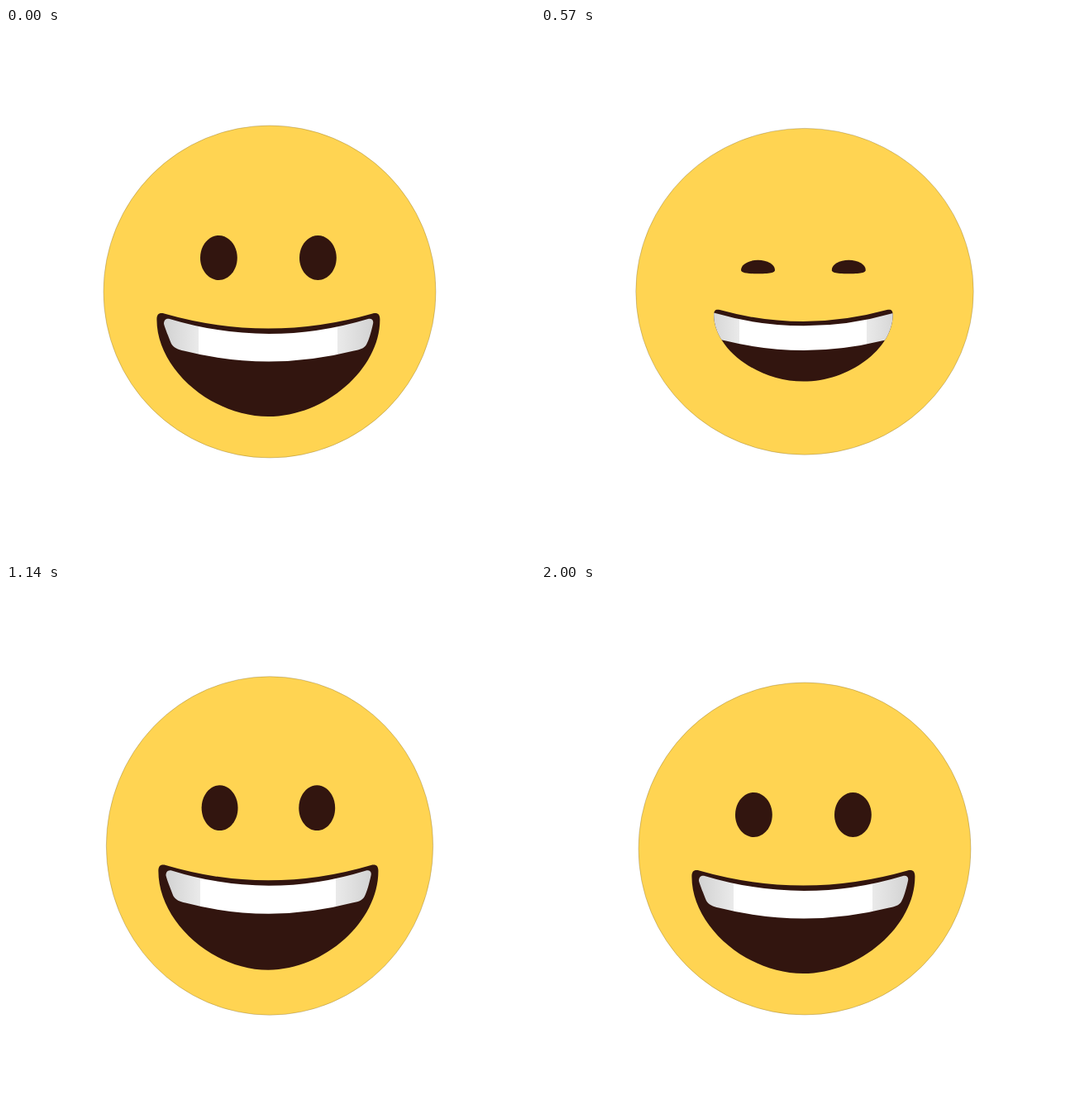
Write an HTML page that moves like this. It is 640 px wide and 640 px high and loops after 2070 ms.

```html
<!DOCTYPE html>
<html lang="en">
<head>
<meta charset="utf-8">
<title>Grinning face</title>
<style>
  html, body { margin: 0; width: 100%; height: 100%; overflow: hidden; background: #fff; }
  svg { display: block; width: 100%; height: 100%; }
</style>
</head>
<body>
<svg viewBox="0 0 640 640">
  <defs>
    <linearGradient id="shade" gradientUnits="userSpaceOnUse" x1="-127" x2="127" y1="0" y2="0">
      <stop offset="0" stop-color="#d2d2d2"/>
      <stop offset=".165" stop-color="#eaeaea"/>
      <stop offset=".165" stop-color="#fff"/>
      <stop offset=".825" stop-color="#fff"/>
      <stop offset=".825" stop-color="#eaeaea"/>
      <stop offset="1" stop-color="#d2d2d2"/>
    </linearGradient>
    <clipPath id="lips"><path id="lipsPath"/></clipPath>
  </defs>
  <ellipse id="head" cx="319" fill="#ffd452" stroke="#4a3a14" stroke-opacity=".5" stroke-width=".5"/>
  <g fill="#32150f">
    <path id="eyeL"/>
    <path id="eyeR"/>
    <path id="mouth"/>
  </g>
  <g clip-path="url(#lips)">
    <path id="teeth" fill="url(#shade)" d="M-127-12C-127-16-125-19-120-18Q0 18 120-18C125-19 127-16 126-12
      C124-3 121 8 118 13C115 18 110 19 103 20.5Q0 46.5-103 20.5C-110 19-115 17-118 12C-122 2-125-5-127-12Z"/>
  </g>
</svg>
<script>
const LOOP = 2070, FRAMES = 29, STEP = LOOP / FRAMES;
const HEAD = 319, FACE = 317.4, RADIUS = 201;
const $ = id => document.getElementById(id);
const set = (id, attrs) => {
  for (const name in attrs) $(id).setAttribute(name, attrs[name]);
};
const ease = u => (1 - Math.cos(Math.PI * u)) / 2;

// Eased swing through a few [frame, value] extremes
function swing(f, ...keys) {
  const i = Math.max(1, keys.findIndex(key => key[0] >= f));
  const [from, a] = keys[i - 1], [to, b] = keys[i];
  return a + (b - a) * ease((f - from) / (to - from));
}

// Ellipse whose underside flattens as the eye squints
function eyePath(x, y, r, top, low) {
  const k = .55, flat = k + .48 * (1 - low / top);
  return `M${x - r} ${y}C${x - r} ${y - k * top} ${x - k * r} ${y - top} ${x} ${y - top}
    C${x + k * r} ${y - top} ${x + r} ${y - k * top} ${x + r} ${y}
    C${x + r} ${y + k * low} ${x + flat * r} ${y + low} ${x} ${y + low}
    C${x - flat * r} ${y + low} ${x - r} ${y + k * low} ${x - r} ${y}Z`;
}

// Half bowl with a sagging lip and rounded corners
function mouthPath(x, y, w, sag, depth) {
  const r = w / 15, k = .51, l = x - w, e = x + w;
  const side = y + .8 * r, chin = y + depth, curve = side + k * (chin - side);
  return `M${l} ${side}C${l} ${y + .1 * r} ${l + .3 * r} ${y - .15 * r} ${l + r} ${y}
    Q${x} ${y + 2 * sag} ${e - r} ${y}
    C${e - .3 * r} ${y - .15 * r} ${e} ${y + .1 * r} ${e} ${side}
    C${e} ${curve} ${x + k * w} ${chin} ${x} ${chin}
    C${x - k * w} ${chin} ${l} ${curve} ${l} ${side}Z`;
}

function draw(now) {
  const f = Math.min(FRAMES - 1, Math.floor((now % LOOP + 4.99) / STEP));
  const cy = HEAD + swing(f, [0, 0], [6, -14], [10.3, 17], [16, -3.5], [28, 0]);
  const stretch = swing(f, [0, 0], [4, 1], [8, -.8], [15, .85], [28, 0]);
  const look = swing(f, [0, 0], [4, -17], [12, 4.8], [16, -4.8], [28, 0]);
  const smile = swing(f, [0, 1], [4, 0], [10.4, 1.05], [16, .98], [28, 1]);
  const squint = swing(f, [0, 0], [4, 0], [8, 1], [12, 0], [28, 0]);

  const rx = RADIUS - 4 * stretch, ry = RADIUS + 4.5 * stretch, tall = ry / rx;
  set('head', { cy, rx, ry });

  const gap = (51 + 9 * smile - 3.5 * squint) * rx / RADIUS, scale = gap / 60;
  const eyeY = cy - 41 + look + 21 * squint, eyeH = 27 * scale * tall;
  const eye = x => eyePath(x, eyeY, 22.4 * scale, eyeH * (1 - .5 * squint), eyeH * (1 - .81 * squint));
  set('eyeL', { d: eye(FACE - gap) });
  set('eyeR', { d: eye(FACE + gap) });

  const mouthY = cy + 25 + 1.5 * smile + .62 * look;
  const sag = (5 + 13 * smile) * tall;
  const depth = (15 + 109.5 * smile - 5 * squint) * tall;
  const d = mouthPath(FACE, mouthY, 37.5 + 97.5 * smile, sag, depth);
  set('mouth', { d });
  set('lipsPath', { d });

  const teethY = mouthY + sag - 5 + 11.4 * Math.cbrt(smile);
  set('teeth', { transform: `translate(318 ${teethY}) scale(${scale} ${scale * tall})` });
}

function tick() {
  draw(performance.now());
  requestAnimationFrame(tick);
}
tick();
</script>
</body>
</html>
```
